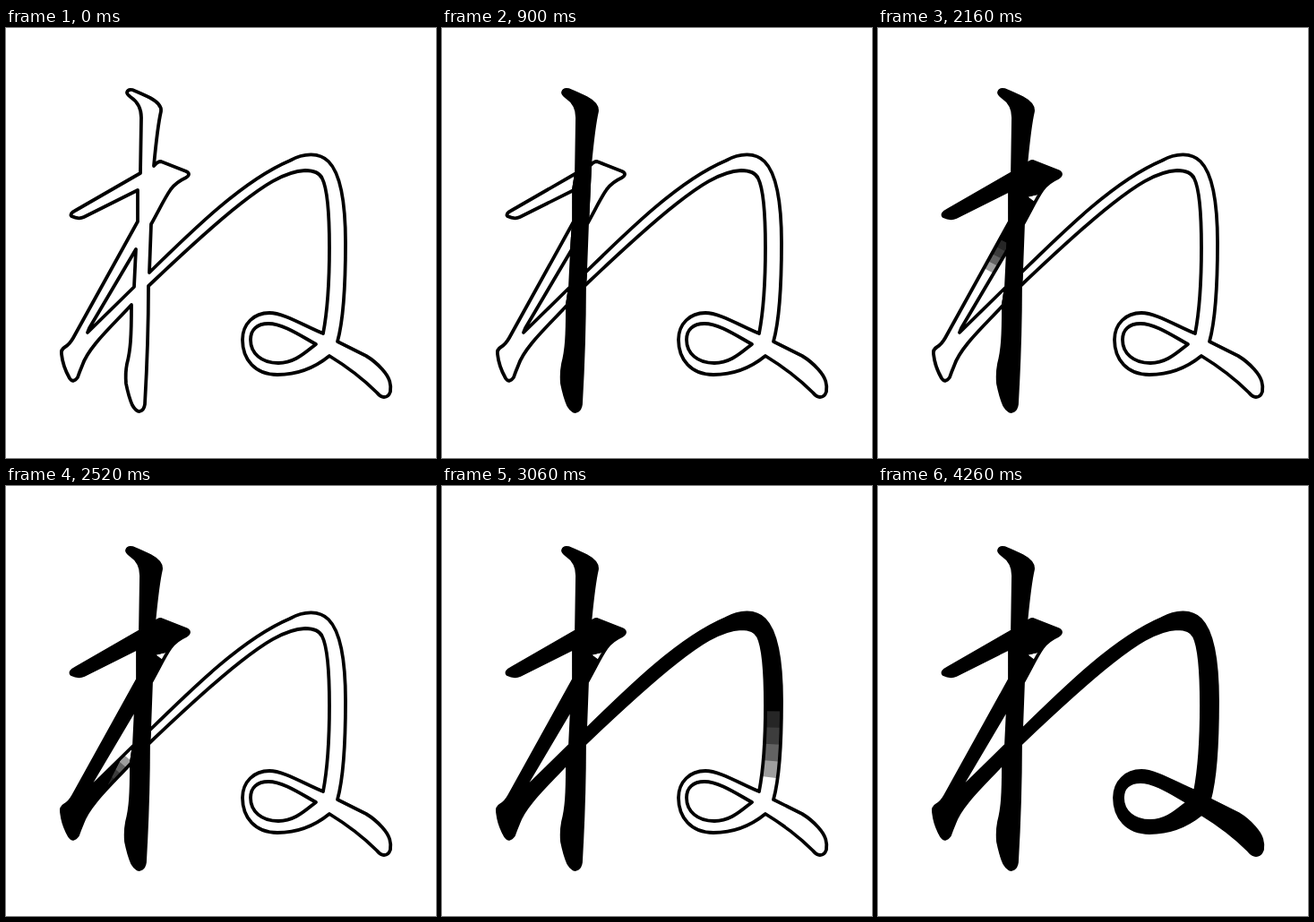
Recreate the animation shown at these times as an HTML page. Size 480 px wide and 480 px high, loop 4720 ms.

```html
<!DOCTYPE html>
<html lang="ja">
<head>
<meta charset="utf-8">
<title>Stroke order</title>
<style>
  html, body { margin: 0; width: 100%; height: 100%; overflow: hidden; background: #fff; }
  svg { display: block; width: 100vw; height: 100vh; }
  .ink path { fill: none; stroke: #000; stroke-linejoin: round; }
  .outline { fill: none; stroke: #000; stroke-width: 3.8; stroke-linejoin: round; }
</style>
</head>
<body>
<svg viewBox="0 0 480 480">
  <defs>
    <path id="glyph" d="
      M135 72Q136 68 141 69Q153 74 161 78Q174 85 173 93C170 106 168 122 165 154
      Q169 149 173 149L201 160Q207 163 201 167Q190 172 184 180C177 190 172 201 162 219
      L160 273C210 224 265 170 317 148C333 139 350 139 360 149
      C374 163 379 195 379 240C379 285 377 325 370 350
      L402 366Q412 372 420 381C429 391 430 398 429 406Q427 412 422 412Q418 412 414 407
      Q392 385 361 366
      C345 379 325 387 303 387C278 387 264 370 264 348
      C264 330 277 318 294 318C310 318 332 332 354 341
      C359 315 361 280 361 245C361 205 358 178 353 168Q349 159 334 159
      C310 160 285 178 262 196C230 221 200 249 159 288
      C159 330 157 385 155 420Q154 427 149 428Q145 428 141 421Q137 412 134 397
      Q133 385 135 375C139 360 140 345 140 309
      C118 333 92 356 85 377Q82 384 80 390Q75 397 71 391C67 384 63 374 62 364
      Q61 359 66 356Q71 353 75 346
      L147 216V181L87 211Q81 214 73 210Q71 207 77 204L150 162
      L151 100Q151 85 139 77Q135 74 135 72Z
      M145 247L143 289L91 340L93 335Z
      M346 353C328 343 309 330 293 330C280 330 273 337 273 348
      C273 363 285 374 304 374C322 374 333 363 346 353Z"/>
    <clipPath id="inside"><use href="#glyph" clip-rule="evenodd"/></clipPath>
    <clipPath id="stem">
      <path d="M120 60H185L175 100L167 154L164 219L162 273L161 288V440H120V340
        L138 309L141 289L143 248L145 216V181L148 162V100L120 80Z"/>
    </clipPath>
  </defs>
  <g class="ink" clip-path="url(#inside)"></g>
  <use class="outline" href="#glyph"/>
</svg>
<script>
const LOOP = 4720, TICK = 60, BANDS = 4;
const linear = (k, n) => k / n;
const slowStart = (k, n) => k <= 2 ? k * 0.04 : 0.08 + 0.92 * (k - 2) / (n - 2);

// lead: length of the graded front, as a share of the path
const strokes = [
  { start: 600, steps: 6, width: 60, lead: 0.12, clip: 'stem', d: 'M150 64V432' },
  { start: 1560, steps: 9, width: 44, lead: 0.12, d: 'M68 211L150 170L208 156' },
  { start: 2100, steps: 9, width: 36, lead: 0.11,
    d: 'M172 192L150 222L70 380L82 372L150 291' },
  { start: 2640, steps: 9, width: 26, lead: 0.17,
    d: 'M150 292C205 237 270 176 325 155C355 146 370 165 370 240Q370 300 364 336' },
  { start: 3180, steps: 9, width: 20, lead: 0.12,
    d: 'M366 322Q365 345 354 359Q334 380 302 380Q269 378 269 347Q269 338 274 329' },
  { start: 3720, steps: 9, width: 30, lead: 0, ease: slowStart,
    d: 'M269 345Q271 325 294 324Q310 325 350 345Q402 368 434 420' }
];

const ink = document.querySelector('.ink');
const make = (tag, attrs, parent) => {
  const el = document.createElementNS('http://www.w3.org/2000/svg', tag);
  for (const name in attrs) el.setAttribute(name, attrs[name]);
  return parent.appendChild(el);
};

for (const s of strokes) {
  const group = make('g', s.clip ? { 'clip-path': `url(#${s.clip})` } : {}, ink);
  s.layers = Array.from({ length: BANDS + 1 }, (_, i) => make('path', {
    d: s.d, pathLength: 1, 'stroke-width': s.width, 'stroke-opacity': i ? 0.38 : 1
  }, group));
}

function draw(now) {
  const t = now % LOOP;
  for (const s of strokes) {
    const count = Math.floor((t - s.start) / TICK) + 1;
    const k = Math.max(0, Math.min(s.steps, count));
    const p = (s.ease || linear)(k, s.steps);
    s.layers.forEach((layer, i) => {
      const front = p + s.lead * (i / BANDS - 0.5);
      const end = k === s.steps ? 1 : Math.max(0, Math.min(1, front));
      layer.style.visibility = k && end ? 'visible' : 'hidden';
      layer.style.strokeDasharray = end < 1 ? `${end} 2` : 'none';
    });
  }
}

const begin = performance.now();
function frame() {
  draw(performance.now() - begin);
  requestAnimationFrame(frame);
}
frame();
</script>
</body>
</html>
```
